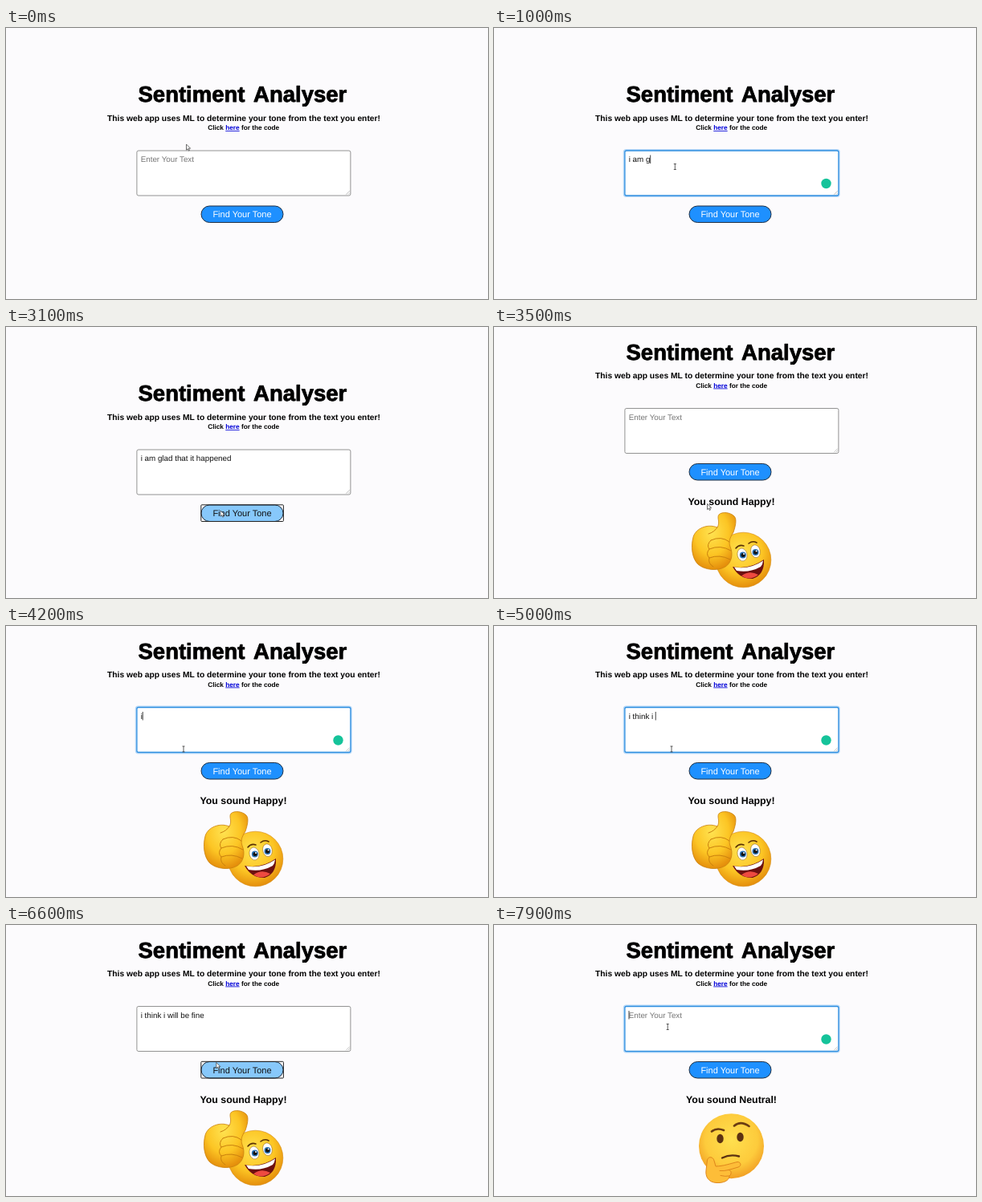
An HTML page that plays this animation: 600x338 px, repeating every 8000 ms.

```html
<!DOCTYPE html>
<html lang="en">
<head>
<meta charset="utf-8">
<title>Sentiment Analyser</title>
<style>
  html, body { margin: 0; width: 100%; height: 100%; overflow: hidden; background: #fcfbfd; }
  svg { display: block; width: 600px; height: 338px; }
  text { font-family: "Liberation Sans", Arial, sans-serif; white-space: pre; text-rendering: geometricPrecision; }
  .mid { text-anchor: middle; }
  .bold { font-weight: 700; }
  .line { fill: none; stroke-linecap: round; stroke-linejoin: round; }
</style>
</head>
<body>
<svg viewBox="0 0 600 338">
  <defs>
    <radialGradient id="ball" cx=".45" cy=".35" r=".65">
      <stop offset="0" stop-color="#ffe250"/><stop offset=".6" stop-color="#fcc524"/><stop offset="1" stop-color="#e58f0c"/>
    </radialGradient>
    <radialGradient id="round" cx=".5" cy=".4" r=".62">
      <stop offset="0" stop-color="#ffe04f"/><stop offset=".65" stop-color="#fdcb3c"/><stop offset="1" stop-color="#f09a22"/>
    </radialGradient>
  </defs>

  <g id="page">
    <text x="164.5" y="92" class="bold" font-size="27.5" word-spacing="4" stroke="#000" stroke-width=".8" stroke-linejoin="round">Sentiment Analyser</text>
    <text x="296" y="115.5" class="mid bold" font-size="10.25">This web app uses ML to determine your tone from the text you enter!</text>
    <text x="295.7" y="127" class="mid bold" font-size="8.25">Click <tspan fill="#0000d8" text-decoration="underline">here</tspan> for the code</text>

    <rect id="glow" x="162.5" y="152.7" width="266.5" height="56.6" rx="2" fill="none" stroke="#8cc4f5" stroke-width="3.4" opacity=".65"/>
    <rect id="box" x="162.9" y="153" width="266" height="56" rx="2" fill="#fff"/>
    <path d="M423.5 207.5l4-4M426 207.5l1.500-1.500" class="line" stroke="#999" stroke-width=".6"/>
    <text id="entry" x="167.7" y="167.2" font-size="9.8"></text>
    <path id="mistake" d="M168 169.300h4.500" stroke="#555" stroke-width=".8"/>
    <path id="caret" d="M0 158.500v10.500" stroke="#111" stroke-width=".8"/>
    <circle id="badge" cx="413.5" cy="194" r="6.2"/>

    <rect id="button" x="243" y="222" width="102" height="20.500" rx="10.250" stroke="#1d2d42"/>
    <rect id="ring" x="242.800" y="221.800" width="102.600" height="20.700" rx="1" fill="none" stroke="#222"/>
    <text id="label" x="294" y="236" class="mid" font-size="11">Find Your Tone</text>
  </g>

  <g id="happy">
    <text x="295.5" y="222" class="mid bold" font-size="12.35">You sound Happy!</text>
    <circle cx="310.5" cy="290.500" r="34.300" fill="url(#ball)" stroke="#d5860c" stroke-width=".6"/>
    <g fill="#fff" stroke="#8a5a10" stroke-width=".5">
      <ellipse cx="309" cy="284" rx="6" ry="8" transform="rotate(-12 309 284)"/>
      <ellipse cx="325.500" cy="279.800" rx="5.800" ry="8" transform="rotate(-12 325 280)"/>
    </g>
    <g fill="#2a72b5"><circle cx="309.800" cy="284.500" r="4"/><circle cx="325.500" cy="281" r="4"/></g>
    <g fill="#111"><circle cx="310" cy="284.500" r="2.500"/><circle cx="325.600" cy="281" r="2.500"/></g>
    <g fill="#fff"><circle cx="311" cy="283" r="1"/><circle cx="326.600" cy="279.500" r="1"/></g>
    <path d="M301 276q4-5 10-3M317 270q5-4 10-1" class="line" stroke="#5a3205" stroke-width="1.600"/>
    <path d="M297 299Q318 303 336 290Q337 309 322 314Q306 315 297 299Z" fill="#6d1010"/>
    <path d="M299 299.500Q318 303 335 291.500Q334.500 296 332 299Q318 307 302 304Z" fill="#fff"/>
    <path d="M308 310.500Q318 303 329 309Q319 317 308 310.500Z" fill="#ee4a40"/>
    <path d="M278 250C282 243 277 238 280 234C284 230 294 231 299 236C303 240 300 250 298 256C293 264 292 268 294 274C298 283 296 294 288 299C278 305 262 303 254 296C246 288 245 273 248 262C251 251 266 245 278 250Z" fill="url(#ball)" stroke="#c9800e" stroke-width=".8"/>
    <path d="M278 250Q274 256 267 258M270 266Q283 260 293 268M268 277Q282 271 295 279M268 288Q281 283 294 290M270 266Q264 272 268 277Q263 283 268 288Q266 295 273 299" class="line" stroke="#c9800e" stroke-width="1"/>
  </g>

  <g id="neutral">
    <text x="295.5" y="222" class="mid bold" font-size="12.35">You sound Neutral!</text>
    <circle cx="295.500" cy="275.700" r="40.500" fill="url(#round)"/>
    <g fill="#5c3212">
      <ellipse cx="281.500" cy="266.500" rx="4.200" ry="5.800"/>
      <ellipse cx="306.500" cy="264.500" rx="4.200" ry="5.800"/>
    </g>
    <path d="M271 257.500Q277 252.500 286 256M299 250.500Q307 243.500 317.500 251" class="line" stroke="#6b3d12" stroke-width="2.600"/>
    <path d="M284 290.500Q294 285.500 305 288.500" class="line" stroke="#5c3212" stroke-width="2.400"/>
    <path d="M265.500 293C267 288 273 289 274 294L276 301C285 301 296 297 303 295.500C308 295.500 308 301 304 302L292 305.500C296 306 296 311 293 313C293 319 285 322 277 321.500C267 321 263 314 264 306Z" fill="#fdbd38" stroke="#df861c"/>
    <path d="M281 306.500Q287 307 292 305.500M282 312.500Q288 314 293 313" class="line" stroke="#df861c"/>
  </g>

  <path id="arrow" d="M0 0v7.200l1.700-1.500 1.100 2.400 1.200-.6-1.100-2.300h2.200z" fill="#fff" stroke="#333" stroke-width=".7"/>
  <path id="beam" d="M-1.500-3.500h3M-1.500 3.500h3M0-3.500v7" fill="none" stroke="#333" stroke-width=".8"/>
</svg>
<script>
const LOOP = 8000, SCROLL = -51.5, FIRST_RESULT = 3250, SECOND_RESULT = 7000;
const $ = id => document.getElementById(id);
const show = (id, on) => $(id).setAttribute('visibility', on ? 'visible' : 'hidden');
const set = (id, attrs) => { for (const k in attrs) $(id).setAttribute(k, attrs[k]); };
const within = (t, spans) => spans.some(([from, to]) => t >= from && t < to);

const typing = [
  { text: 'i am glad that it happened', start: 454, rate: 84, clear: FIRST_RESULT },
  { text: 'i think i will be fine', start: 4040, rate: 95, clear: SECOND_RESULT }
];
const focusSpans = [[290, 3000], [3990, 6480], [7650, LOOP]];
const badgeSpans = [[500, 3000], [4190, 6480], [7790, LOOP]];
const hoverSpans = [[2940, FIRST_RESULT], [6430, SECOND_RESULT]];
const ringSpans = [[3000, FIRST_RESULT], [6480, SECOND_RESULT]];

// time, x, y
const pointer = [
  [0, 224.5, 145], [260, 225.3, 173], [2660, 225.3, 173], [2960, 267, 229],
  [3300, 267, 229], [3450, 265.5, 220.5], [3600, 265.5, 220.5], [3980, 221, 153.5],
  [6150, 221, 153.5], [6460, 261.8, 171.5], [7250, 261.8, 171.5], [7600, 216.2, 127], [LOOP, 216.2, 127]
];

function pointerAt(t) {
  const i = pointer.findIndex(p => p[0] > t);
  const [t0, x0, y0] = pointer[i - 1], [t1, x1, y1] = pointer[i];
  const u = (t - t0) / (t1 - t0), e = u * u * (3 - 2 * u);
  return [x0 + (x1 - x0) * e, y0 + (y1 - y0) * e];
}

function typedAt(t) {
  const job = typing.find(j => t >= j.start && t < j.clear);
  return job ? job.text.slice(0, Math.floor((t - job.start) / job.rate)) : '';
}

function draw(t) {
  const scroll = t >= FIRST_RESULT ? SCROLL : 0;
  set('page', { transform: `translate(0 ${scroll})` });
  show('happy', t >= FIRST_RESULT && t < SECOND_RESULT);
  show('neutral', t >= SECOND_RESULT);

  const focused = within(t, focusSpans);
  show('glow', focused);
  set('box', { stroke: focused ? '#2f8fe0' : '#929292', 'stroke-width': focused ? 1.3 : 1 });

  const typed = typedAt(t), entry = $('entry');
  entry.textContent = typed || 'Enter Your Text';
  set('entry', { fill: typed ? '#111' : '#757575' });
  const caretX = 168 + (typed ? entry.getComputedTextLength() : 0);
  set('caret', { transform: `translate(${caretX} 0)` });
  show('caret', focused);

  const flagged = t >= 1950 && t < 3000;
  show('mistake', flagged);
  show('badge', within(t, badgeSpans));
  set('badge', { fill: flagged ? '#e0142f' : '#15c39a' });

  const hover = within(t, hoverSpans);
  set('button', { fill: hover ? '#87c8fb' : '#1e90ff' });
  set('label', { fill: hover ? '#111' : '#fff' });
  show('ring', within(t, ringSpans));

  const [x, y] = pointerAt(t);
  const overBox = x > 163 && x < 429 && y > 153 + scroll && y < 209 + scroll;
  show('beam', overBox);
  show('arrow', !overBox);
  set(overBox ? 'beam' : 'arrow', { transform: `translate(${x} ${y})` });
}

function tick() {
  draw(performance.now() % LOOP);
  requestAnimationFrame(tick);
}
tick();
</script>
</body>
</html>
```
